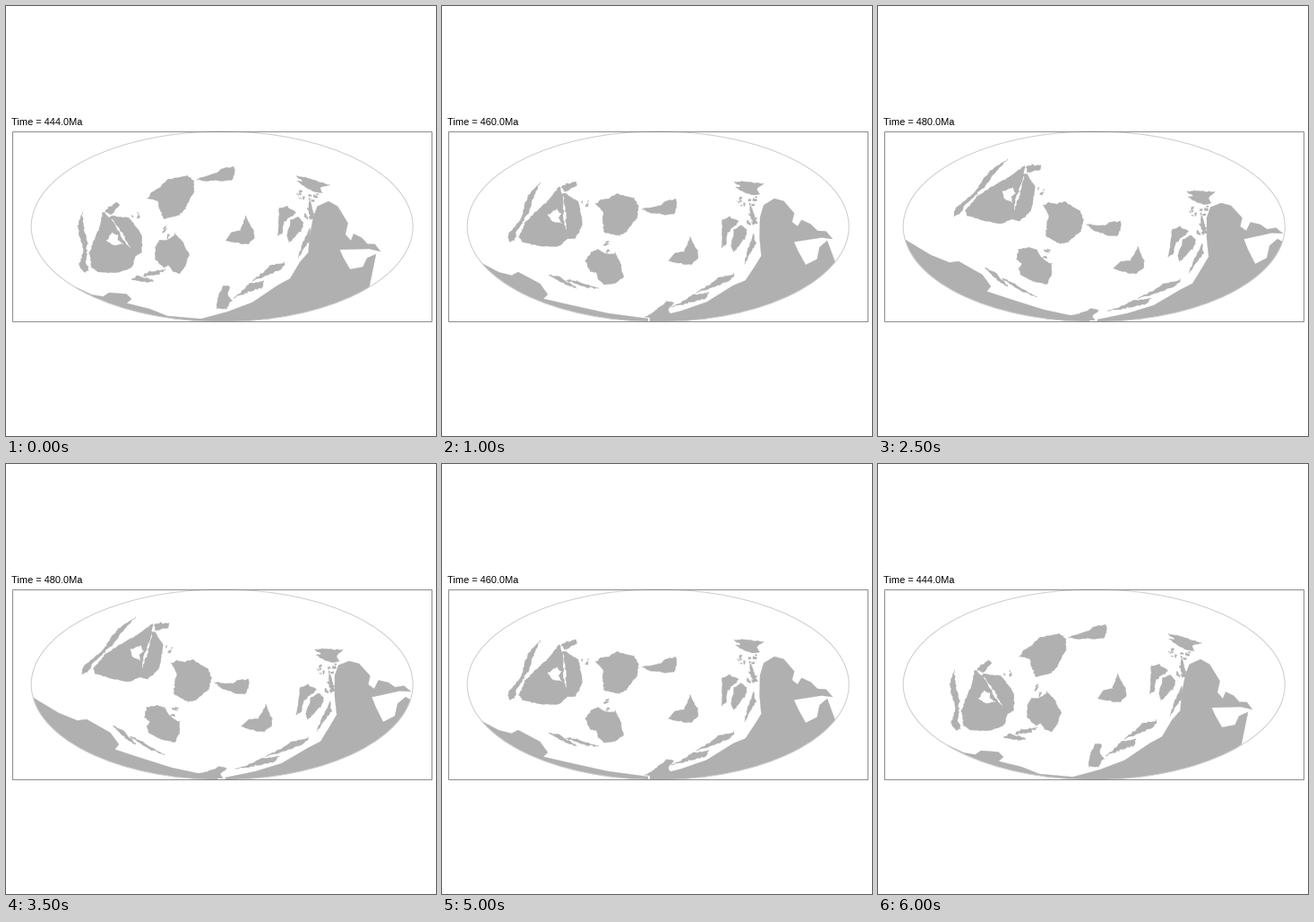
Recreate the animation shown at these times as a matplotlib script. Size 480 by 480 pixels, loop 6500 ms.

```python
import numpy as np
import matplotlib.pyplot as plt
from matplotlib.animation import FuncAnimation
from matplotlib.patches import Circle, Ellipse, Polygon, Rectangle

SIZE, DPI = 480, 100
PX = 72 / DPI
LAND = "#b0b0b0"
CX, CY, RX, RY = 241.2, 246.2, 213, 106.25
KEYS = np.array([444, 460, 470, 480])
BASE = 2
RISE = [444, 450, 460, 465, 470, 480, 485]
AGES = RISE + RISE[-2::-1]

rng = np.random.default_rng(7)
fig = plt.figure(figsize=(SIZE / DPI, SIZE / DPI), dpi=DPI, facecolor="white")
ax = fig.add_axes([0, 0, 1, 1])
ax.set(xlim=(0, SIZE), ylim=(SIZE, 0))
ax.axis("off")

globe = Ellipse((CX, CY), 2 * RX, 2 * RY, fc="none", ec="#cccccc", lw=PX, zorder=5)
ax.add_patch(globe)
ax.add_patch(Rectangle((7, 139.7), 468.3, 212.5, fc="none", ec="#808080",
                       lw=0.9 * PX, zorder=6))
label = ax.text(6.3, 133, "", family="Liberation Sans", size=11 * PX, color="black")
site = Circle((378.4, 241.5), 2.8, fc="#ff5a50", ec="none", zorder=7)
ax.add_patch(site)

movers = []


def pairs(flat):
    return np.array(flat, float).reshape(-1, 2)


def to_sphere(p):
    """Mollweide pixels to unit vectors."""
    t = np.arcsin(np.clip((CY - p[:, 1]) / RY, -0.9999, 0.9999))
    lon = np.pi * np.clip((p[:, 0] - CX) / RX / np.cos(t), -1, 1)
    lat = np.arcsin((2 * t + np.sin(2 * t)) / np.pi)
    return np.c_[np.cos(lat) * np.cos(lon), np.cos(lat) * np.sin(lon), np.sin(lat)]


THETA = np.linspace(-np.pi / 2, np.pi / 2, 2001)
SIN_LAT = (2 * THETA + np.sin(2 * THETA)) / np.pi


def to_map(v):
    t = np.interp(v[:, 2], SIN_LAT, THETA)
    lon = np.arctan2(v[:, 1], v[:, 0])
    return np.c_[CX + RX * lon / np.pi * np.cos(t), CY - RY * np.sin(t)]


def blend(poses, age):
    """Pose at any age, carried on past the oldest key."""
    i = int(np.clip(np.searchsorted(KEYS, age) - 1, 0, len(KEYS) - 2))
    w = (age - KEYS[i]) / (KEYS[i + 1] - KEYS[i])
    return poses[i] * (1 - w) + poses[i + 1] * w


def ragged(p, rough=0.45, step=2.5):
    """Closed outline with a finely broken coast."""
    p = np.vstack([p, p[:1]])
    d = np.r_[0, np.cumsum(np.hypot(*np.diff(p, axis=0).T))]
    s = np.union1d(d, np.arange(0, d[-1], step))
    q = np.c_[np.interp(s, d, p[:, 0]), np.interp(s, d, p[:, 1])]
    return q + rng.normal(0, rough, q.shape)


def add_patch(color, z):
    patch = Polygon([(0, 0), (1, 1)], fc=color, ec=color, lw=0.3 * PX, zorder=z)
    ax.add_patch(patch)
    patch.set_clip_path(globe)
    return patch


def drift(*marks, base=BASE):
    """Rigid turn of the globe that carries the marks from their base pose."""
    marks = [pairs(m) for m in marks]
    start = to_sphere(marks[base])

    def turn(age):
        u, _, vt = np.linalg.svd(to_sphere(blend(marks, age)).T @ start)
        return u @ np.diag([1, 1, np.linalg.det(u @ vt)]) @ vt
    return turn


def plate(turn, points, color=LAND, z=2):
    patch = add_patch(color, z)
    vec = to_sphere(points)
    movers.append(lambda age: patch.set_xy(to_map(vec @ turn(age).T)))


def land(turn, *flat, **style):
    plate(turn, ragged(pairs(flat)), **style)


def islets(turn, centre, spread, count):
    for _ in range(count):
        a = np.sort(rng.uniform(0, 2 * np.pi, 5))
        r = rng.uniform(0.9, 2.4, (5, 1))
        middle = np.array(centre) + rng.uniform(-1, 1, 2) * spread
        plate(turn, middle + r * np.c_[np.cos(a), np.sin(a)])


def coast(outline, index, marks, corner):
    """Shore of the great landmass; shifts of the marks spread along it."""
    patch = add_patch(LAND, 2)
    p = pairs(outline)
    d = np.r_[0, np.cumsum(np.hypot(*np.diff(p, axis=0).T))]
    marks = [pairs(m) for m in marks]
    marks.insert(BASE, p[index])

    def move(age):
        shift = blend(marks, age) - p[index]
        q = p + np.c_[[np.interp(d, d[index], c) for c in shift.T]].T
        first, last = q[0], q[-1]
        side = first[1] if corner == 0 else last[1]
        inner = last[0] if corner == 0 else first[0]
        ends = [(inner, 365), (corner, 365), (corner, side)]
        if corner:
            ends.reverse()
        patch.set_xy(np.vstack([q, ends]))
    movers.append(move)


# Southern landmass, western then eastern half
coast([33, 267, 62, 283, 82, 290, 92, 288, 112, 301, 118, 313, 113, 318,
       140, 325, 190, 341, 232, 350],
      [0, 3, 5, 7, 8, 9],
      [[78, 314, 115, 320, 140, 327, 160, 338, 180, 346, 225, 350],
       [44, 287, 85, 297, 118, 322, 140, 333, 185, 343, 230, 349],
       [29, 260, 90, 285, 126, 313, 150, 328, 185, 339, 236, 350]], 0)
coast([240, 349, 275, 342, 305, 333, 335, 316, 350, 307, 362, 287, 368, 275,
       364, 255, 362, 232, 367, 222, 380, 219, 390, 222, 401, 236, 398, 246,
       404, 251, 409, 241, 420, 243, 428, 248, 438, 246, 446, 252, 434, 251,
       414, 255, 404, 257, 409, 268, 418, 284, 430, 278, 432, 265, 440, 258,
       453, 268],
      [0, 3, 5, 8, 10, 14, 19, 24, 27, 28],
      [[215, 350, 303, 312, 328, 286, 343, 236, 360, 218, 385, 262, 418, 274,
        384, 294, 413, 277, 405, 316],
       [232, 349, 325, 312, 349, 291, 355, 236, 371, 215, 397, 246, 436, 260,
        406, 289, 430, 262, 440, 289],
       [245, 350, 337, 317, 362, 292, 367, 236, 383, 220, 411, 251, 452, 254,
        421, 288, 446, 260, 456, 266]], 480)

# Western continent, its outer arc, northern cap and inland water
west = drift([82, 227, 90, 297, 147, 250], [109, 196, 76, 262, 155, 233],
             [133, 181, 82, 243, 166, 225], [146, 171, 86, 233, 172, 215])
land(west, 93, 240, 104, 225, 120, 213, 135, 203, 147, 193, 152, 189, 152, 198,
     156, 198, 167, 211, 166, 238, 154, 251, 146, 249, 135, 255, 115, 252, 96, 245)
land(west, 133, 181, 117, 203, 111, 214, 92, 233, 87, 243, 81, 245, 82, 236,
     101, 220, 108, 207, 115, 195)
land(west, 154, 190, 160, 187, 170, 187, 169, 192, 156, 196)
land(west, 131, 219, 142, 214, 146, 220, 142, 224, 144, 231, 134, 226,
     color="white", z=3)
land(west, 153, 201, 150, 225, 147, 239, 147, 226, color="white", z=3)
islets(west, (174, 215), (4, 4), 4)

# Northern continents
north = drift([156, 216, 208, 191], [170, 221, 218, 218],
              [180, 226, 225, 228], [184, 222, 228, 233])
land(north, 180, 226, 187, 222, 195, 222, 204, 218, 222, 224, 227, 234, 226, 246,
     214, 260, 205, 265, 188, 259, 187, 246, 188, 236)
tail = drift([213, 194, 255, 181], [223, 227, 262, 217],
             [231, 238, 269, 234], [233, 244, 271, 242])
land(tail, 231, 238, 249, 238, 256, 234, 269, 232, 269, 242, 265, 249, 255, 249,
     248, 246, 237, 243)

# Mid-ocean wedge
wedge = drift([267, 235, 246, 261], [277, 258, 253, 284],
              [288, 267, 260, 291], [291, 268, 262, 293])
land(wedge, 288, 267, 291, 276, 295, 284, 294, 291, 286, 297, 278, 297, 260, 291,
     268, 284, 279, 282, 283, 276)

# South-western continent and its island chain
south = drift([166, 283, 206, 276], [161, 285, 203, 302],
              [160, 278, 198, 311], [157, 272, 190, 311])
land(south, 160, 277, 170, 273, 178, 273, 185, 281, 197, 286, 199, 300, 197, 311,
     182, 311, 170, 307, 165, 300, 167, 293, 160, 289)
islets(south, (190, 275), (2, 5), 5)
chain = drift([149, 305, 172, 298], [123, 302, 172, 315],
              [118, 294, 175, 319], [117, 290, 181, 326])
land(chain, 118, 294, 128, 297, 146, 312, 134, 307)
land(chain, 137, 303, 150, 307, 175, 319, 160, 315)

# Islands off the southern landmass
inner = drift([237, 336, 250, 313], [229, 347, 260, 330],
              [238, 346, 275, 339], [212, 347, 245, 341], base=0)
land(inner, 237, 324, 243, 312, 250, 313, 247, 322, 252, 329, 245, 338, 235, 338)
outer = drift([254, 326, 311, 286], [256, 336, 326, 299],
              [265, 341, 330, 308], [262, 340, 333, 309], base=1)
land(outer, 256, 336, 268, 330, 280, 323, 298, 320, 294, 327, 280, 330)
land(outer, 284, 320, 297, 312, 308, 304, 326, 299, 322, 306, 308, 312)

# Eastern terranes and slivers
east = drift([343, 200, 304, 260, 322, 246], [343, 204, 313, 270, 332, 258],
             [353, 210, 320, 279, 341, 267], [361, 213, 324, 281, 345, 270])
land(east, 323, 247, 330, 244, 341, 249, 327, 262, 325, 275, 320, 279)
land(east, 335, 258, 344, 253, 350, 258, 347, 268, 333, 283, 331, 276)
land(east, 337, 205, 345, 203, 368, 204, 361, 211, 365, 216, 355, 218, 338, 211, 345, 209)
land(east, 357, 262, 359, 272, 345, 295, 350, 280)
land(east, 353, 227, 362, 250, 357, 252, 354, 240)
islets(east, (351, 226), (13, 6), 13)
islets(east, (356, 242), (5, 10), 9)


def draw(i):
    age = AGES[i]
    for move in movers:
        move(age)
    label.set_text(f"Time = {age:.1f}Ma")
    site.set_visible(age == 470)
    return []


anim = FuncAnimation(fig, draw, frames=len(AGES), interval=500, repeat=True,
                     repeat_delay=0, blit=False)
plt.show()
```
